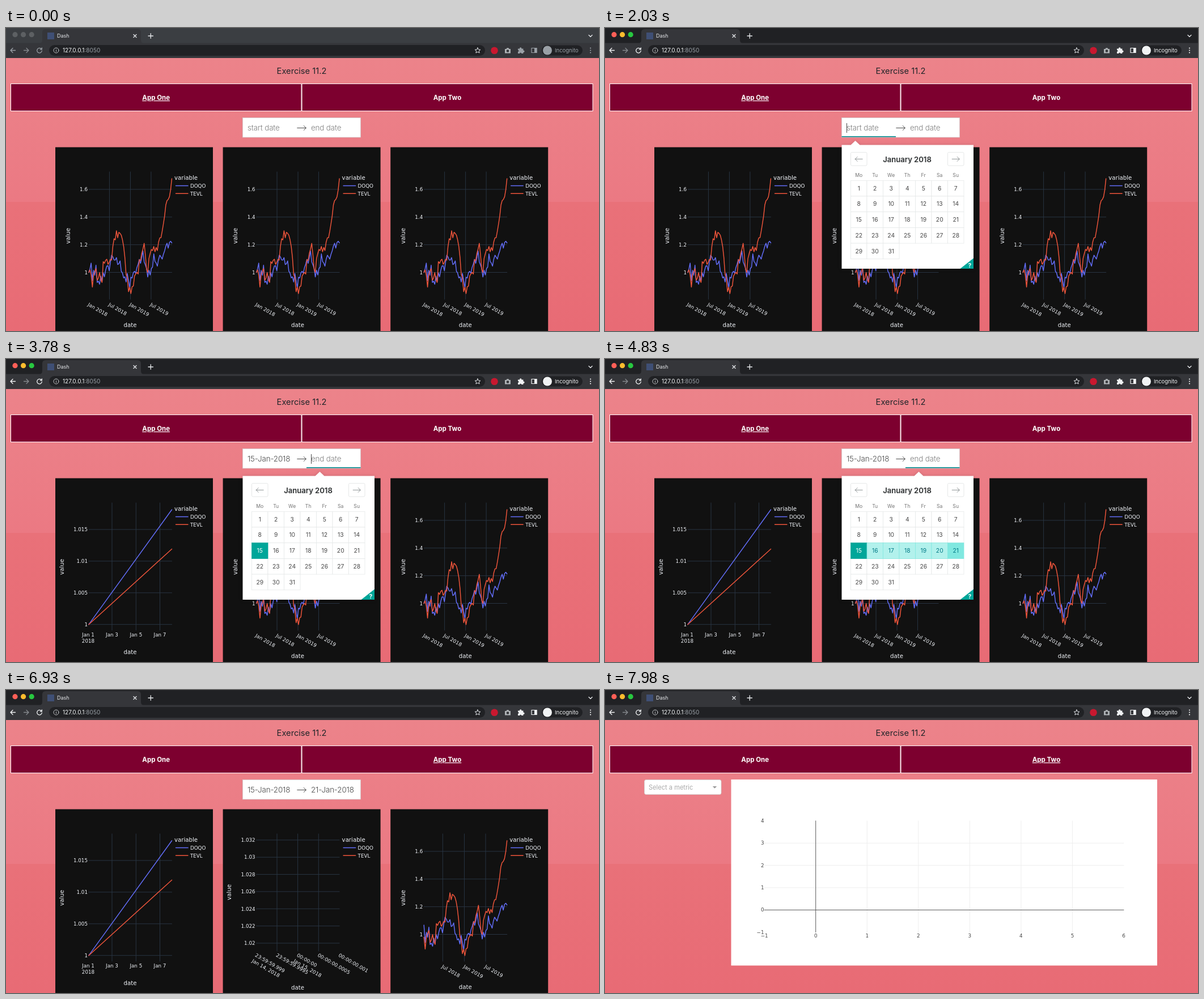
Recreate the animation shown at these times as an HTML page. Size 1046 px wide and 535 px high, loop 8000 ms.

```html
<!DOCTYPE html>
<html lang="en">
<head>
<meta charset="utf-8">
<title>Dash</title>
<style>
  html, body { margin: 0; height: 100%; overflow: hidden; background: #ea7680; }
  svg { display: block; font-family: Inter, "Open Sans", sans-serif; }
  .plot { font: 8.75px "DejaVu Sans", sans-serif; fill: #f2f5fa; }
  .big { font-size: 10.2px; }
  .mid { text-anchor: middle; }
  .end { text-anchor: end; }
  .nav { font-size: 11.5px; font-weight: 700; fill: #fff; text-anchor: middle; }
  .on { text-decoration: underline; }
  .field { font-size: 13.4px; font-weight: 300; letter-spacing: -.15px; }
  .line { fill: none; stroke-linecap: round; stroke-linejoin: round; }
  .cal { filter: drop-shadow(0 1px 3px #0003); }
</style>
</head>
<body>
<svg id="stage" width="1046" height="535" viewBox="0 0 1046 535"></svg>
<script>
const LOOP = 8000, STEP = 70, GAP = 295.6;
const BLUE = '#636efa', RED = '#ef553b', GRID = '#283442', TEAL = '#00a699';
const LEFT = 146, WIDE = 146.5, DAYS = 728;

// Price relative to the first day, in thousandths, evenly spaced over two years
const blueData = [1000, 1025, 1067, 942, 1015, 979, 1052, 927, 936, 914, 973, 935, 997, 968, 1015, 1046, 1048, 1012,
  1075, 1124, 1111, 1090, 1089, 1107, 1057, 1063, 1083, 1008, 995, 960, 968, 931, 993, 940, 889, 965, 959, 997,
  1008, 994, 1035, 1060, 1094, 1065, 1105, 1155, 1076, 1054, 1029, 967, 1015, 981, 1027, 1039, 1134, 1078, 1068,
  1045, 1094, 1124, 1111, 1096, 1130, 1156, 1189, 1211, 1175, 1216, 1225, 1213];
const redData = [1000, 1018, 980, 894, 985, 1007, 1028, 943, 959, 999, 947, 927, 1078, 1065, 1087, 1095, 1058, 1074,
  1094, 1089, 1189, 1243, 1235, 1301, 1250, 1290, 1282, 1269, 1236, 1186, 1106, 985, 963, 861, 893, 847, 896, 901,
  974, 988, 1000, 988, 1092, 1086, 1137, 1168, 1210, 1127, 1023, 1000, 1102, 1136, 1166, 1158, 1187, 1149, 1180,
  1158, 1219, 1250, 1251, 1297, 1350, 1409, 1487, 1519, 1527, 1547, 1597, 1678];

const text = (x, y, s, attrs = '') => `<text x="${x}" y="${y}" ${attrs}>${s}</text>`;
const plotText = (x, y, s, cls = '', attrs = '') => text(x, y, s, `class="plot ${cls}" ${attrs}`);
const tilted = (x, y, s) => plotText(0, 0, s, '', `transform="translate(${x} ${y}) rotate(30)"`);
const rect = (x, y, w, h, fill, attrs = '') =>
  `<rect x="${x}" y="${y}" width="${w}" height="${h}" fill="${fill}" ${attrs}/>`;
const disc = (x, y, r, fill) => `<circle cx="${x}" cy="${y}" r="${r}" fill="${fill}"/>`;
const path = (d, stroke, w = 1, attrs = '') =>
  `<path class="line" d="${d}" stroke="${stroke}" stroke-width="${w}" ${attrs}/>`;
const shape = (d, fill) => `<path d="${d}" fill="${fill}" fill-rule="evenodd"/>`;
const group = (x, y, s, attrs = '') => `<g transform="translate(${x} ${y})" ${attrs}>${s}</g>`;
const ramp = (t, a, b) => Math.min(1, Math.max(0, (t - a) / (b - a)));
const within = (t, a, b) => t >= a && t < b;

function browser(active) {
  const ink = active ? '#f1f3f4' : '#9aa0a6', dim = '#85898d';
  const lights = active ? ['#ff5f57', '#febc2e', '#28c840'] : Array(3).fill('#5d6063');
  return rect(0, 0, 1046, 53, '#35363a')
    + rect(0, 0, 1046, 26.5, active ? '#202124' : '#3b3e42')
    + shape('M58 27q6 0 6-6V8q0-6 6-6H232q6 0 6 6V21q0 6 6 6z', '#35363a')
    + lights.map((c, i) => disc(16 + 14.6 * i, 11.7, 4.6, c)).join('')
    + rect(73, 8, 12, 12, '#3f4f75')
    + text(90, 17, 'Dash', 'font-size="9" fill="#e8eaed"')
    + path('M225 11.5l5 5m0-5l-5 5M251 14h8.500m-4.250-4.250v8.500M1028 12.500l3 3 3-3', '#e8eaed', 1.3)
    + path('M16.500 39.500H8m4-4l-4 4 4 4', ink, 1.3)
    + path('M31.500 39.500H40m-4-4l4 4-4 4', dim, 1.3)
    + path('M62.500 37.200a4.300 4.300 0 1 0 .8 3M63.300 34.800v3h-3', ink, 1.3)
    + rect(76, 30, 769, 19, '#202124', 'rx="9.5"')
    + path('M93 39.500a4.500 4.500 0 1 0-9 0 4.500 4.500 0 1 0 9 0M88.500 39.200v2.300M88.500 37.200v.1', '#c4c7ca', 1)
    + text(100, 43.2, '127.0.0.1<tspan fill="#9aa0a6">:8050</tspan>', 'font-size="10.1" fill="#f1f3f4"')
    + path('M832 34.800l1.400 3.200 3.500.3-2.600 2.300.8 3.400-3.100-1.800-3.100 1.800.8-3.400-2.600-2.300 3.500-.3z', '#dfe1e5')
    + disc(861.5, 39.7, 6.3, '#c9182f')
    + shape('M880 37h2.500l1-1.700h3l1 1.700h2.500v7.500H880zM885 38.200a2.300 2.300 0 1 0 .01 0z', '#aeb2b5')
    + shape('M903 36.500h3v-.5a1.700 1.700 0 0 1 3.400 0v.5h3v3h.5a1.700 1.700 0 0 1 0 3.400h-.5v2h-3.200a1.500 1.500 0 0 0-3 0H903v-3.200a1.500 1.500 0 0 0 0-3z', ink)
    + path('M927 35.500h9v8h-9z', ink, 1.2) + rect(932, 35, 4.5, 9, ink)
    + rect(945, 30.5, 72, 18, '#202124', 'rx="9"')
    + disc(955, 39.5, 8, ink)
    + text(968, 43, 'Incognito', `font-size="9.5" fill="${ink}"`)
    + [35.5, 39.5, 43.5].map(y => disc(1031, y, 1.1, ink)).join('');
}

function modebar(x, y, opacity, ink) {
  if (opacity <= 0) return '';
  const box = 'M-5.500-5.500h11v11h-11z';
  const icons = [
    [-150.6, shape('M-6-3.500h3l1.300-2h3.400L3-3.500h3v8.500H-6zM0-1.700a2.400 2.400 0 1 0 .01 0z', ink)],
    [-127.6, path('M3-1A4 4 0 1 0-5-1 4 4 0 1 0 3-1M2 2l3.500 3.500M-3-1h4M-1-3v4', ink, 1.8), 2],
    [-109.6, path('M-5 0H5M0-5V5M-4-1l-1 1 1 1M4-1l1 1-1 1M-1-4l1-1 1 1M-1 4l1 1 1-1', ink, 1.2)],
    [-86.6, shape(box + 'M-3.500-1h2.500v-2.500h2V-1h2.500v2H1v2.500h-2V1h-2.500z', ink)],
    [-68.6, shape(box + 'M-3.500-1h7v2h-7z', ink)],
    [-51.6, path('M-5-2.500V-5h2.500M2.500-5H5v2.500M5 2.500V5H2.500M-2.500 5H-5V2.500M-2.500-2.500l5 5m0-5l-5 5', ink, 1.3)],
    [-33.6, shape('M-6 0L0-5.500 6 0H4.500v5H1.300V1.500h-2.600V5h-3.200z', ink)],
    [-10.6, rect(-5.5, -5.5, 11, 11, '#4f618f'), 3]
  ];
  return group(x, y, icons.map(([dx, s, k = 1]) =>
    group(dx, 0, s, `opacity="${Math.min(1, .36 * k)}"`)).join(''), `opacity="${opacity}"`);
}

function series(data, first, color) {
  const points = data.slice(first).map((v, i, all) =>
    `${(LEFT + i / (all.length - 1) * WIDE).toFixed(1)} ${(431.5 - (v - 1000) * .2443).toFixed(1)}`);
  return path('M' + points.join('L'), color, 1.45);
}

const rows = (list, right = 144) => list.map(([y, s]) =>
  path(`M${LEFT} ${y}h${WIDE}`, GRID) + plotText(right, y + 3.2, s, 'end')).join('');
const columns = (xs, bottom) => xs.map(x => path(`M${x} 254V${bottom}`, GRID)).join('');
const titles = (x, y, dateY) => plotText(219, dateY, 'date', 'big mid')
  + plotText(0, 0, 'value', 'big mid', `transform="translate(${x} ${y}) rotate(-90)"`);

function fullPlot(trimmed) {
  const start = trimmed ? 21 : 0, first = trimmed ? 2 : 0;
  const ticks = [[0, 'Jan 2018'], [181, 'Jul 2018'], [365, 'Jan 2019'], [546, 'Jul 2019']]
    .filter(([d]) => d >= start)
    .map(([d, s]) => [LEFT + (d - start) / (DAYS - start) * WIDE, s]);
  return rows([1, 1.2, 1.4, 1.6].map(v => [431.5 - (v - 1) * 244.3, v]))
    + columns(ticks.map(([x]) => x).filter(x => x > LEFT), 479)
    + ticks.map(([x, s]) => tilted(x - 2.5, 490, s)).join('')
    + series(blueData, first, BLUE) + series(redData, first, RED)
    + titles(112.5, 367, 528);
}

function weekPlot() {
  const xs = [145, 187, 229.3, 271.5];
  return rows(['1', '1.005', '1.01', '1.015'].map((s, i) => [468.7 - 55.9 * i, s]))
    + columns(xs.slice(1), 479)
    + xs.map((x, i) => plotText(x, 490, 'Jan ' + (2 * i + 1), 'mid')).join('')
    + plotText(145, 501.2, '2018', 'mid')
    + path('M146 468.700L292.500 266', BLUE, 1.45) + path('M146 468.700L292.500 335.500', RED, 1.45)
    + titles(101.5, 367, 521);
}

function emptyPlot() {
  const labels = ['23:59:59.999', '23:59:59.9995', '00:00:00', '00:00:00.0005', '00:00:00.001'];
  return rows([0, 1, 2, 3, 4, 5, 6].map(i => [447 - 30.35 * i, +(1.02 + .002 * i).toFixed(3)]))
    + columns([182.4, 219, 255.7], 461)
    + labels.map((s, i) => tilted(143 + 36.8 * i, 470, s)).join('')
    + tilted(137.3, 480, 'Jan 14, 2018') + tilted(210.9, 480, 'Jan 15, 2018')
    + titles(101.5, 357, 528.5);
}

function chart(column, plot, barOpacity = 0) {
  const legend = [['DOQO', BLUE], ['TEVL', RED]].map(([s, c], i) =>
    path(`M299.500 ${278.5 + 13.8 * i}h21.500`, c, 1.45) + plotText(325, 281.8 + 13.8 * i, s)).join('');
  return group(column * GAP, 0, rect(87, 210.5, 278, 325, '#111') + plot
    + plotText(297, 267.5, 'variable', 'big') + legend
    + modebar(365, 223.5, barOpacity, '#fff'));
}

const arrow = (x, y, w, dir, color, weight) =>
  path(`M${x - w / 2} ${y}h${w}M${x + dir * (w / 2 - 4)} ${y - 4}l${4 * dir} 4l${-4 * dir} 4`, color, weight);

function picker(t) {
  const start = t >= 3570, end = t >= 4970;
  const field = (x, s, set) => text(x, 181, s, `class="field" fill="${set ? '#484848' : '#808080'}"`);
  const focusX = within(t, 2030, 3570) ? 417.5 : within(t, 3570, 4970) ? 530 : 0;
  const caretX = within(t, 2030, 2590) || within(t, 3080, 3360) ? 426
    : within(t, 3570, 4130) || within(t, 4620, 4830) ? 538 : 0;
  return rect(417.5, 158.5, 208, 34.5, '#fff', 'stroke="#cacccd" stroke-width=".7"')
    + field(426, start ? '15-Jan-2018' : 'start date', start)
    + field(538, end ? '21-Jan-2018' : 'end date', end)
    + arrow(521.5, 176.5, 15.5, 1, '#484848', 1)
    + (focusX ? rect(focusX, 191, 95.5, 1.6, '#008489') : '')
    + (caretX ? rect(caretX, 168, 1, 17, '#484848') : '');
}

const hoverPath = [[2450, 3], [2800, 10], [2870, 9], [2940, 16], [3080, 15], [4130, 12], [4200, 13], [4270, 14], [4550, 21]];

function dayStyle(day, t, hover) {
  if (t >= 3570) {
    if (day === 15) return [TEAL, TEAL, '#fff'];
    if (day > 15 && day <= hover) return [day === 21 && t >= 4830 ? '#80e8e0' : '#b2f1ec', '#80e8e0', '#007a87'];
  }
  return [day === hover ? '#e4e7e7' : '#fff', '#e4e7e7', '#484848'];
}

function calendar(t) {
  const hover = hoverPath.reduce((last, [at, day]) => t >= at ? day : last, 0);
  const tip = t < 3570 ? 441.5 : 553.5;
  const cell = (day, [fill, stroke, ink]) => {
    const col = (day - 1) % 7, x = 433.5 + 28.5 * col, y = 269.3 + 27.7 * Math.floor((day - 1) / 7);
    return rect(x, y, 28.5, 27.7, fill, `stroke="${stroke}" stroke-width=".75"`)
      + text(x + 14.25, y + 17.4, day, `class="mid" font-size="10.3" fill="${ink}"`);
  };
  const button = (x, dir) => rect(x, 219.5, 28.5, 23.5, '#fff', 'rx="2" stroke="#e0e3e3" stroke-width=".8"')
    + arrow(x + 14.2, 231.4, 13, dir, '#82888a', .9);
  const days = Array.from({ length: 31 }, (_, i) => i + 1).map(d => [d, dayStyle(d, t, hover)]);
  days.sort((a, b) => (a[1][1] !== '#e4e7e7') - (b[1][1] !== '#e4e7e7'));
  return shape(`M417.500 206.500H${tip - 8}L${tip} 199l8 7.500H650V425H417.500z`, '#fff').replace('<path', '<path class="cal"')
    + button(433.5, -1) + button(604.5, 1)
    + text(533, 237, 'January 2018', 'class="mid" font-size="12.9" font-weight="700" fill="#3c3f40"')
    + ['Mo', 'Tu', 'We', 'Th', 'Fr', 'Sa', 'Su'].map((s, i) =>
        text(447.7 + 28.5 * i, 263.4, s, 'class="mid" font-size="8.7" fill="#757575"')).join('')
    + days.map(([d, style]) => cell(d, style)).join('')
    + shape('M626.500 425H650V406.500z', TEAL)
    + text(643.5, 423, '?', 'class="mid" font-size="10.3" font-weight="700" fill="#fff"');
}

function pageOne(t) {
  const midBar = ramp(t, 4900, 5110) * (1 - ramp(t, 5180, 5480));
  const lastBar = ramp(t, 5140, 5440) * (1 - ramp(t, 5440, 5740));
  return chart(0, t < 3780 ? fullPlot() : weekPlot())
    + chart(1, t < 5040 ? fullPlot() : emptyPlot(), t >= 4970 ? midBar : 0)
    + chart(2, fullPlot(t >= 5110), lastBar)
    + picker(t) + (within(t, 2030, 4970) ? calendar(t) : '');
}

function pageTwo(t) {
  const X = n => 371.7 + 90.55 * n, Y = n => 388.4 - 39.35 * n;
  const label = (x, y, n, cls) => plotText(x, y, n < 0 ? '−' + -n : n, cls, 'style="fill:#444"');
  let s = rect(69.5, 158.5, 135.5, 26, '#fff', 'rx="3" stroke="#ccc" stroke-width=".8"')
    + text(77, 175.7, 'Select a metric', 'font-size="11.1" fill="#aaa"')
    + shape('M189.800 170h7.400l-3.700 3.800z', '#999')
    + rect(222.5, 158, 751.5, 328.5, '#fff');
  for (let n = 1; n < 6; n++) s += path(`M${X(n)} ${Y(4)}V${Y(-1)}`, '#eee');
  for (let n = 1; n < 4; n++) s += path(`M${X(-1)} ${Y(n)}H${X(6)}`, '#eee');
  s += path(`M${X(-1)} ${Y(0)}H${X(6)}M${X(0)} ${Y(4)}V${Y(-1)}`, '#5a5a5a');
  for (let n = -1; n < 7; n++) s += label(X(n), 437.3, n, 'mid');
  for (let n = -1; n < 5; n++) s += label(280.5, Y(n) + 3, n, 'end');
  return s + modebar(974, 171, .5 * ramp(t, 7700, 7840) * (1 - ramp(t, 7840, 7980)), '#444');
}

function scene(t) {
  const second = t >= 6930;
  return `<defs><linearGradient id="bg" x2="0" y2="1">
      <stop stop-color="#ec838a"/><stop offset=".528" stop-color="#eb7983"/>
      <stop offset=".528" stop-color="#e97179"/><stop offset="1" stop-color="#e86b75"/>
    </linearGradient></defs>`
    + rect(0, 53, 1046, 482, 'url(#bg)')
    + browser(t >= 1400)
    + text(521.5, 81.2, 'Exercise 11.2', 'class="mid" font-size="14.7" fill="#212529"')
    + [8.5, 522].map(x => rect(x, 98.5, x < 9 ? 512.5 : 513, 48, '#7d002f', 'stroke="#fff" stroke-width="1"')).join('')
    + text(264.7, 127, 'App One', `class="nav ${second ? '' : 'on'}"`)
    + text(778.5, 127, 'App Two', `class="nav ${second ? 'on' : ''}"`)
    + (t < 7000 ? pageOne(t) : pageTwo(t));
}

const stage = document.getElementById('stage');
const begin = performance.now();
let shown = -1;
function tick() {
  const t = Math.floor((performance.now() - begin) % LOOP / STEP) * STEP;
  if (t !== shown) stage.innerHTML = scene(shown = t);
  requestAnimationFrame(tick);
}
tick();
</script>
</body>
</html>
```
